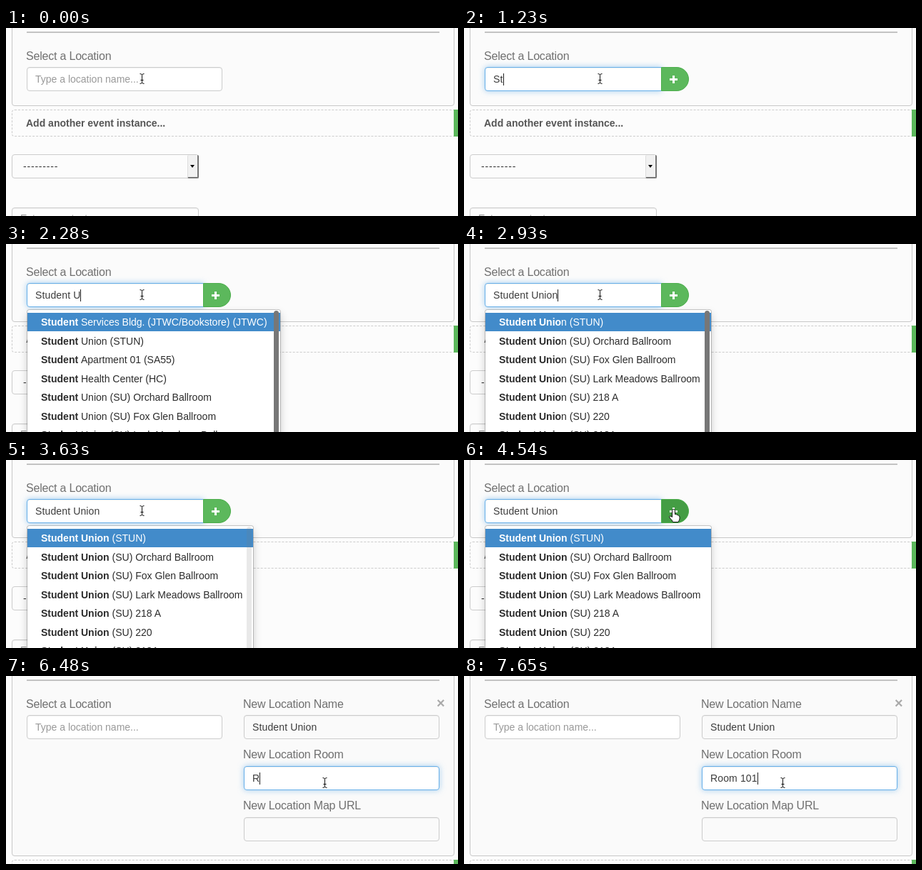
Recreate the animation shown at these times as an HTML page. Size 633 by 265 pixels, loop 8000 ms.

```html
<!DOCTYPE html>
<html lang="en">
<head>
<meta charset="utf-8">
<title>Location picker</title>
<style>
html, body { margin: 0; width: 100%; height: 100%; overflow: hidden; background: #fcfcfc; }
#stage { position: relative; width: 633px; height: 265px; overflow: hidden; background: #fcfcfc;
  font: 14px/20px "Liberation Sans", Arial, sans-serif; color: #3c3c3c; }
#stage * { box-sizing: border-box; }
#stage div, #cursor { position: absolute; }
.label, .field, .row, #add { white-space: pre; }
#panel { left: 8px; top: -10px; width: 620px; border: 1px solid #c8c8c8; border-radius: 4px; background: #fbfbfb; }
#rule { left: 29px; top: 5px; width: 578px; height: 2px; background: #c3c3c3; }
.label { font-size: 16px; letter-spacing: -.2px; color: #707070; }
.field { height: 34px; padding: 6px 11px; border: 1px solid #ccc; border-radius: 4px; letter-spacing: .13px;
  box-shadow: inset 0 1px 1px rgba(0,0,0,.05); }
.hint { color: #999; letter-spacing: 0; }
.caret { display: inline-block; width: 1px; height: 17px; margin-right: -1px; vertical-align: -4px; background: #222; }
#details { left: 332px; top: 0; width: 300px; height: 253px; }
#details .field { left: 1px; width: 274px; }
#close { left: 271px; top: 28px; font-size: 20px; font-weight: bold; color: #aaa; }
#below { left: 0; width: 633px; height: 200px; }
#add { left: 8px; top: 115px; width: 640px; height: 38px; padding: 8px 19px; border: 1px dashed #ccc;
  border-radius: 4px; font-weight: bold; color: #555; }
#addButton { left: 627px; top: 115px; width: 6px; height: 38px; background: #5cb85c; }
#select { left: 8px; top: 178px; width: 262px; height: 34px; padding: 6px 15px; border: 1px solid #ccc; border-radius: 4px;
  letter-spacing: .8px; }
#arrow { right: -1px; top: 0; width: 16px; height: 33px; background: #f1f1f1; border: solid #777;
  border-width: 0 2px 2px 0; border-left: 1px solid #ddd; border-radius: 2px; }
#arrow::after { content: ""; position: absolute; left: 3px; top: 14px; border: 3.5px solid transparent;
  border-top: 4px solid #000; border-bottom: 0; }
#plus { left: 276px; top: 55px; width: 39px; height: 34px; border: 1px solid #4cae4c; border-radius: 0 17px 17px 0; }
#plus::before, #plus::after { content: ""; position: absolute; left: 11px; top: 15px; width: 11px; height: 3px; background: #fff; }
#plus::after { transform: rotate(90deg); }
#menu { left: 29px; top: 92px; height: 240px; border: 1px solid rgba(0,0,0,.2); border-radius: 4px; background: #fff;
  background-clip: padding-box; box-shadow: 0 6px 12px rgba(0,0,0,.175); color: #2c2c2c; }
#rows { left: 0; top: 4px; width: 100%; }
.row { left: 0; width: 100%; height: 26px; padding: 3px 19px; }
.row:first-child { background: #428bca; color: #fff; }
#bar { right: 2px; top: 1px; width: 7px; height: 220px; border-radius: 4px; background: #777; }
#cursor { left: 0; top: 0; overflow: visible; }
</style>
</head>
<body>
<div id="stage">
  <div id="panel"></div>
  <div id="rule"></div>
  <div class="label" style="left:28px;top:30px">Select a Location</div>
  <div class="field" id="search" style="left:29px;top:55px;background:#fff"></div>
  <div id="plus"></div>
  <div id="details">
    <div class="label" style="top:30px">New Location Name</div>
    <div class="label" style="top:101px">New Location Room</div>
    <div class="label" style="top:173px">New Location Map URL</div>
    <div class="field" style="top:55px">Student Union</div>
    <div class="field" style="top:127px" id="room"></div>
    <div class="field" style="top:199px"></div>
    <div id="close">×</div>
  </div>
  <div id="below">
    <div id="add">Add another event instance...</div>
    <div id="addButton"></div>
    <div id="select">---------<div id="arrow"></div></div>
    <div class="field hint" style="left:8px;top:253px;width:262px;padding-top:4px">Enter a contact...</div>
  </div>
  <div id="menu"><div id="rows"></div><div id="bar"></div></div>
  <svg id="cursor" width="1" height="1">
    <defs><path id="beamShape" fill="none" d="M-3-7Q0-7 0-5V5Q0 7-3 7M3-7Q0-7 0-5M0 5Q0 7 3 7M-2 2H2"/></defs>
    <g id="beam">
      <use href="#beamShape" stroke="#fff" stroke-width="2.6"/>
      <use href="#beamShape" stroke="#111"/>
    </g>
    <path id="hand" fill="#fff" stroke="#111" d="M-2 9V0Q-2-2 0-2Q2-2 2 0V5Q4 4 4.7 6Q6.5 5.3 7 7Q8.5 7 8.5 9V11Q8.5 13 6.5 16H-1Q-2 13-5 10.5Q-7 8-5 7.5Q-3.5 7.5-2 9Z"/>
    <path id="pointer" fill="#000" stroke="#fff" d="M0 0V14L3.2 11L5.4 16L7.6 15L5.4 10.2H10Z"/>
  </svg>
</div>
<script>
const $ = id => document.getElementById(id);
const LOOP = 8000, CLICK = 4840, BUTTON = 1230, MENU_LAG = 90;
const query = "Student Union", roomName = "Room 101";
const queryKeys = [960, 1230, 1340, 1430, 1660, 1690, 1990, 2100, 2280, 2520, 2760, 2820, 2870];
const roomKeys = [6480, 6660, 6760, 6860, 6970, 7120, 7380, 7650];
const halls = ["Orchard", "Fox Glen", "Lark Meadows"].map(n => `Student Union (SU) ${n} Ballroom`);
const allPlaces = ["Student Services Bldg. (JTWC/Bookstore) (JTWC)", "Student Union (STUN)",
  "Student Apartment 01 (SA55)", "Student Health Center (HC)", ...halls];
const unionPlaces = ["Student Union (STUN)", ...halls,
  "Student Union (SU) 218 A", "Student Union (SU) 220", "Student Union (SU) 218A"];
// Pointer stops: time, x, y
const stops = [[0, 190, 71], [3770, 190, 71], [4540, 293, 71], [CLICK, 293, 71],
  [5370, 442, 153], [5550, 442, 153], [5650, 446, 150], [LOOP, 446, 150]];

const clamp = v => Math.max(0, Math.min(1, v));
const ramp = (t, from, to) => clamp((t - from) / (to - from));
const mix = (a, b, k) => a + (b - a) * k;
const show = (el, on) => { el.style.display = on ? "" : "none"; };
const typed = (text, keys, t) => text.slice(0, keys.filter(k => k <= t).length);

function caret(t, resets) {
  const last = resets.filter(r => r <= t).pop();
  const on = last !== undefined && (t - last) % 1000 < 500;
  return on ? '<span class="caret"></span>' : "";
}

function setFocus(el, border, glow) {
  const rgb = [102, 175, 233].map(c => Math.round(mix(204, c, border)));
  el.style.borderColor = `rgb(${rgb})`;
  el.style.boxShadow = `inset 0 1px 1px rgba(0,0,0,.06), 0 0 8px rgba(102,175,233,${.6 * glow})`;
}

function drawSearch(t) {
  const el = $("search"), open = t < CLICK, grouped = open && t >= BUTTON;
  const text = open ? typed(query, queryKeys, t) : "";
  const hint = text ? "" : '<span class="hint">Type a location name...</span>';
  el.style.width = grouped ? "248px" : "274px";
  el.style.borderRadius = grouped ? "4px 0 0 4px" : "4px";
  el.innerHTML = text + (open ? caret(t, [80, ...queryKeys, 3000]) : "") + hint;
  setFocus(el, open ? ramp(t, 0, 140) : 1 - ramp(t, CLICK, CLICK + 150), grouped ? 1 : 0);
  show($("plus"), grouped);
}

function drawMenu(t) {
  const n = typed(query, queryKeys, t - MENU_LAG).length;
  const narrow = n > 8;
  show($("menu"), n > 1 && t < CLICK);
  $("menu").style.width = (narrow ? 318 : 349 + Math.min(n, 7)) + "px";
  $("rows").innerHTML = (narrow ? unionPlaces : allPlaces).map((name, i) =>
    `<div class="row" style="top:${i * 26.5}px"><b>${name.slice(0, n)}</b>${name.slice(n)}</div>`).join("");
  $("bar").style.opacity = 1 - ramp(t, 3480, 3660);
}

function drawDetails(t) {
  const expanded = t >= CLICK, focus = ramp(t, 5670, 5830);
  show($("details"), expanded);
  $("panel").style.height = (expanded ? 264 : 120) + "px";
  $("panel").style.background = expanded ? "#fafafa" : "#fbfbfb";
  $("below").style.top = (expanded ? 144 : 0) + "px";
  $("room").innerHTML = typed(roomName, roomKeys, t) + caret(t, [5770, ...roomKeys]);
  $("room").style.background = focus ? "#fff" : "";
  setFocus($("room"), focus, focus);
}

function drawCursor(t) {
  const i = stops.findIndex(s => s[0] > t);
  const [t0, x0, y0] = stops[i - 1], [t1, x1, y1] = stops[i];
  const u = ramp(t, t0, t1), k = u * u * (3 - 2 * u);
  const x = Math.round(mix(x0, x1, k)), y = Math.round(mix(y0, y1, k));
  const hand = t < CLICK && x >= 276;
  const beam = !hand && (t < CLICK || (x < 303 && y < 89) || (x > 333 && (y < 89 || y > 127)));
  show($("hand"), hand);
  show($("beam"), beam);
  show($("pointer"), !hand && !beam);
  $("plus").style.background = hand ? "#449d44" : "#5cb85c";
  $("cursor").style.transform = `translate(${x + .5}px, ${y + .5}px)`;
}

function frame(now) {
  const t = now % LOOP;
  drawSearch(t);
  drawMenu(t);
  drawDetails(t);
  drawCursor(t);
  requestAnimationFrame(frame);
}
requestAnimationFrame(frame);
</script>
</body>
</html>
```
